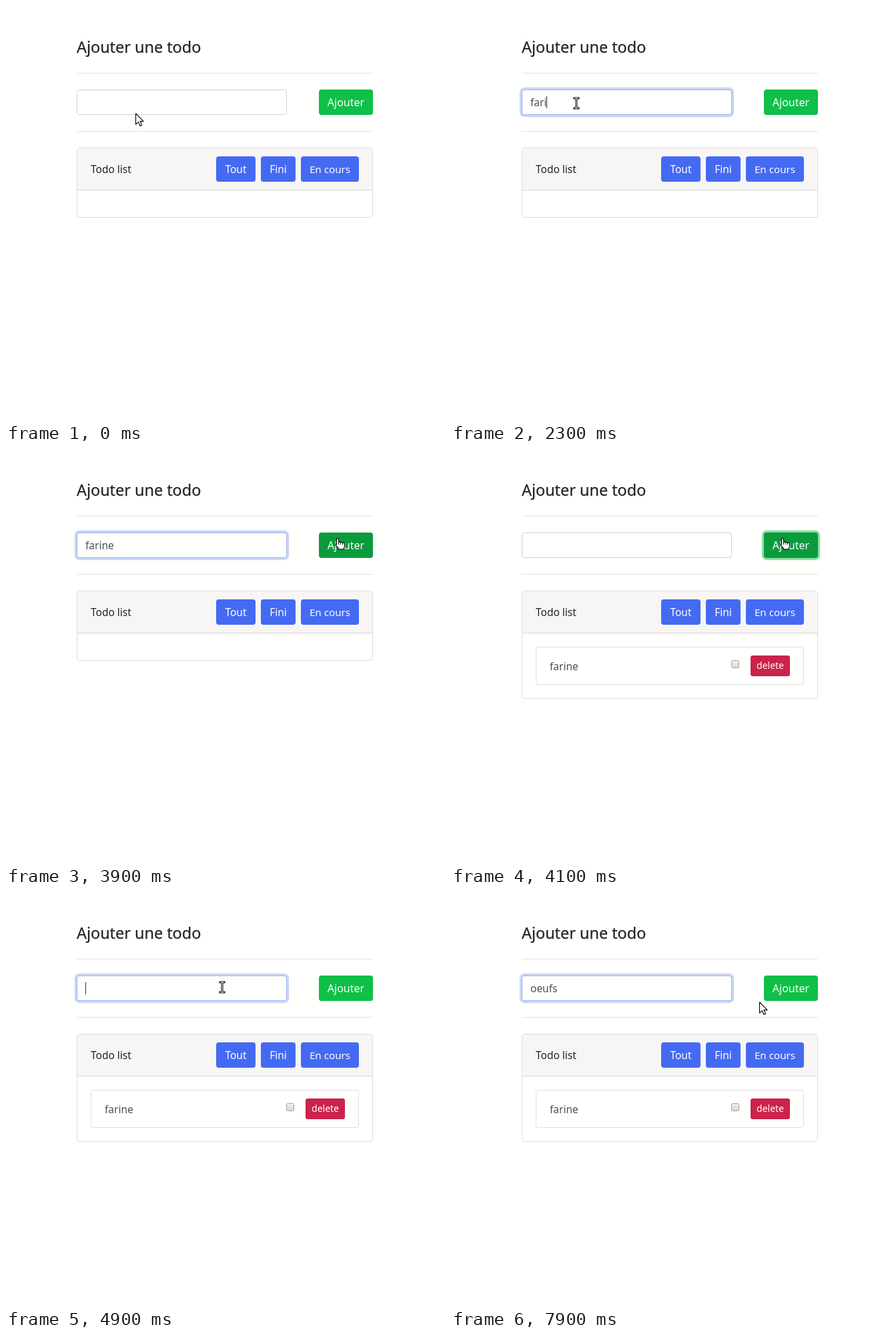
Write an HTML page that moves like this. It is 658 by 621 pixels and loops after 8000 ms.

```html
<!DOCTYPE html>
<html lang="fr">
<head>
<meta charset="utf-8">
<title>Todo list</title>
<style>
  html, body { margin: 0; width: 100%; height: 100%; overflow: hidden; background: #fffffd; }
  svg { display: block; width: 658px; height: 621px; }
  text { font: 15.5px "Noto Sans", "Open Sans", sans-serif; fill: #212529; white-space: pre; }
  .title { font-size: 23.4px; font-weight: 500; stroke: #212529; stroke-width: .25px; }
  .btn text { fill: #fff; text-anchor: middle; }
  .btn .big { font-size: 16px; }
  .btn .small { font-size: 14px; }
  .blue { fill: #456af2; }
  .red { fill: #cb2349; }
  .box { fill: #fffffd; stroke: #dededd; }
  .soft { fill: #495057; }
  .rule { fill: #e4e4e3; }
  .cursor { fill: #fff; stroke: #000; stroke-width: 1.1; stroke-linejoin: round; }
</style>
</head>
<body>
<svg viewBox="0 0 658 621">
  <defs>
    <linearGradient id="tick" x2="0" y2="1">
      <stop stop-color="#f1f1f0"/><stop offset="1" stop-color="#d5d5d4"/>
    </linearGradient>
  </defs>

  <text class="title" x="106" y="70">Ajouter une todo</text>
  <rect class="rule" x="106" y="100" width="444" height="1"/>
  <rect class="rule" x="106" y="187" width="444" height="1"/>

  <rect id="inputRing" fill="#c9d5fa"/>
  <rect id="input" x="106.5" y="125.5" width="314" height="37" rx="3.5" fill="#fffffd"/>
  <text id="typed" class="soft" x="119" y="150"></text>
  <rect id="caret" y="135" width="1" height="18" fill="#343a40"/>

  <rect id="addRing" fill="#87e0a3"/>
  <g class="btn">
    <rect id="add" x="469" y="125" width="81" height="38" rx="4"/>
    <text class="big" x="509.5" y="150">Ajouter</text>
  </g>

  <rect id="card" class="box" x="106.5" y="212.5" width="443" rx="3.5"/>
  <path d="M107 275V216q0-3 3-3H546q3 0 3 3V275Z" fill="#f7f6f5"/>
  <rect x="107" y="275" width="442" height="1" fill="#d9d9d8"/>
  <text x="127" y="250">Todo list</text>
  <g class="btn">
    <rect class="blue" x="315" y="225" width="59" height="38" rx="4"/>
    <text x="344.5" y="250">Tout</text>
    <rect class="blue" x="382" y="225" width="52" height="38" rx="4"/>
    <text x="408" y="250">Fini</text>
    <rect class="blue" x="442" y="225" width="87" height="38" rx="4"/>
    <text x="485.5" y="250" style="font-size:15.2px">En cours</text>
  </g>

  <g id="item">
    <rect class="box" x="127.5" y="296.5" width="401" height="56" rx="3.5"/>
    <text class="soft" x="148" y="331">farine</text>
    <rect x="420.5" y="316.5" width="11" height="11" rx="2" fill="url(#tick)" stroke="#a0a09f"/>
    <g class="btn">
      <rect class="red" x="449" y="309" width="59" height="31" rx="3.2"/>
      <text class="small" x="478.5" y="329">delete</text>
    </g>
  </g>

  <g class="cursor">
    <path id="arrow" d="M.5 .8V17.2L4.3 13.6L7 19.4L9.6 18.2L7 12.6H12Z"/>
    <g id="beam" fill="none">
      <path d="M-4.5-7H4.5M-4.5 8H4.5M0-7V8" stroke-width="3"/>
      <path d="M-3.2-7H3.2M-3.2 8H3.2M0-7V8" stroke="#fff" stroke-width="1"/>
    </g>
    <g id="hand">
      <path d="M2.5 10V2Q2.5 .6 4 .6T5.5 2V6.3Q7 5.2 8.3 6.7Q10 5.7 11.2 7.3Q14.5 6.6 14.5 9.5V12Q14 15 12.7 17H6Q4.5 14 1.2 11.2Q.2 8.8 2.5 10Z"/>
      <path d="M5.5 6V10M8.4 6.8V10M11.3 7.5V10.4" stroke-width=".9"/>
    </g>
  </g>
</svg>

<script>
const LOOP = 8000, STEP = 100;
const $ = id => document.getElementById(id);

// Each track holds [start ms, value...]; the latest started entry applies.
const moves = [
  [0, 'arrow', 194, 160], [100, 'arrow', 216, 100], [200, 'arrow', 300, 70],
  [300, 'arrow', 430, 58], [400, 'arrow', 526, 85], [500, 'arrow', 440, 108],
  [600, 'beam', 320, 138], [700, 'beam', 188, 145],
  [3200, 'beam', 240, 150], [3300, 'arrow', 410, 180], [3400, 'arrow', 601, 212],
  [3500, 'hand', 520, 145], [3600, 'hand', 493, 133],
  [4200, 'hand', 488, 133], [4300, 'hand', 472, 132], [4400, 'arrow', 389, 129],
  [4500, 'beam', 340, 138], [4600, 'beam', 324, 142],
  [7700, 'beam', 350, 147], [7800, 'arrow', 425, 156], [7900, 'arrow', 462, 164]
];
const typing = [
  [0, ''], [1800, 'f'], [1900, 'fa'], [2100, 'far'], [2300, 'fari'], [2500, 'farin'],
  [2600, 'farine'], [4100, ''], [6200, 'o'], [6300, 'oe'], [6400, 'oeu'],
  [6800, 'oeuf'], [7000, 'oeufs']
];
const caretOn = [
  [0, 0], [800, 1], [1300, 0], [1800, 1], [3200, 0],
  [4800, 1], [5400, 0], [6200, 1], [7500, 0]
];
const inputFocus = [[0, 0], [800, .6], [900, 1], [4000, .5], [4100, 0], [4800, .6], [4900, 1]];
const addFocus = [[0, 0], [4000, .6], [4100, 1], [4800, .5], [4900, .15], [5000, 0]];
const addHover = [[0, 0], [3500, .5], [3600, 1], [4400, .5], [4500, 0]];

const at = (track, t) => track.filter(k => k[0] <= t).pop().slice(1);
const mix = (a, b, k) => `rgb(${a.map((v, i) => Math.round(v + (b[i] - v) * k))})`;

function set(el, attrs) {
  for (const name in attrs) el.setAttribute(name, attrs[name]);
}

function ring(el, x, width, level) {
  const d = 3.2 * level;
  set(el, {
    x: x - d, y: 125 - d, width: width + 2 * d, height: 38 + 2 * d,
    rx: 4 + d, opacity: level
  });
}

function draw(t) {
  const [focus] = at(inputFocus, t);
  ring($('inputRing'), 106, 315, focus);
  set($('input'), { stroke: mix([206, 210, 211], [158, 179, 236], focus) });

  const [word] = at(typing, t);
  const typed = $('typed');
  if (typed.textContent !== word) typed.textContent = word;
  const end = word ? typed.getComputedTextLength() : 0;
  set($('caret'), { x: Math.round(119 + end), opacity: at(caretOn, t)[0] });

  ring($('addRing'), 469, 81, at(addFocus, t)[0]);
  set($('add'), { fill: mix([14, 191, 72], [11, 155, 60], at(addHover, t)[0]) });

  const added = t >= 4100;
  set($('item'), { visibility: added ? 'visible' : 'hidden' });
  set($('card'), { height: added ? 161 : 104 });

  const [kind, x, y] = at(moves, t);
  for (const id of ['arrow', 'beam', 'hand']) {
    set($(id), {
      visibility: id === kind ? 'visible' : 'hidden',
      transform: `translate(${x} ${y})`
    });
  }
}

const start = performance.now();
function tick() {
  const t = (performance.now() - start) % LOOP;
  draw(Math.floor(t / STEP) * STEP);
  requestAnimationFrame(tick);
}
draw(0);
requestAnimationFrame(tick);
</script>
</body>
</html>
```
